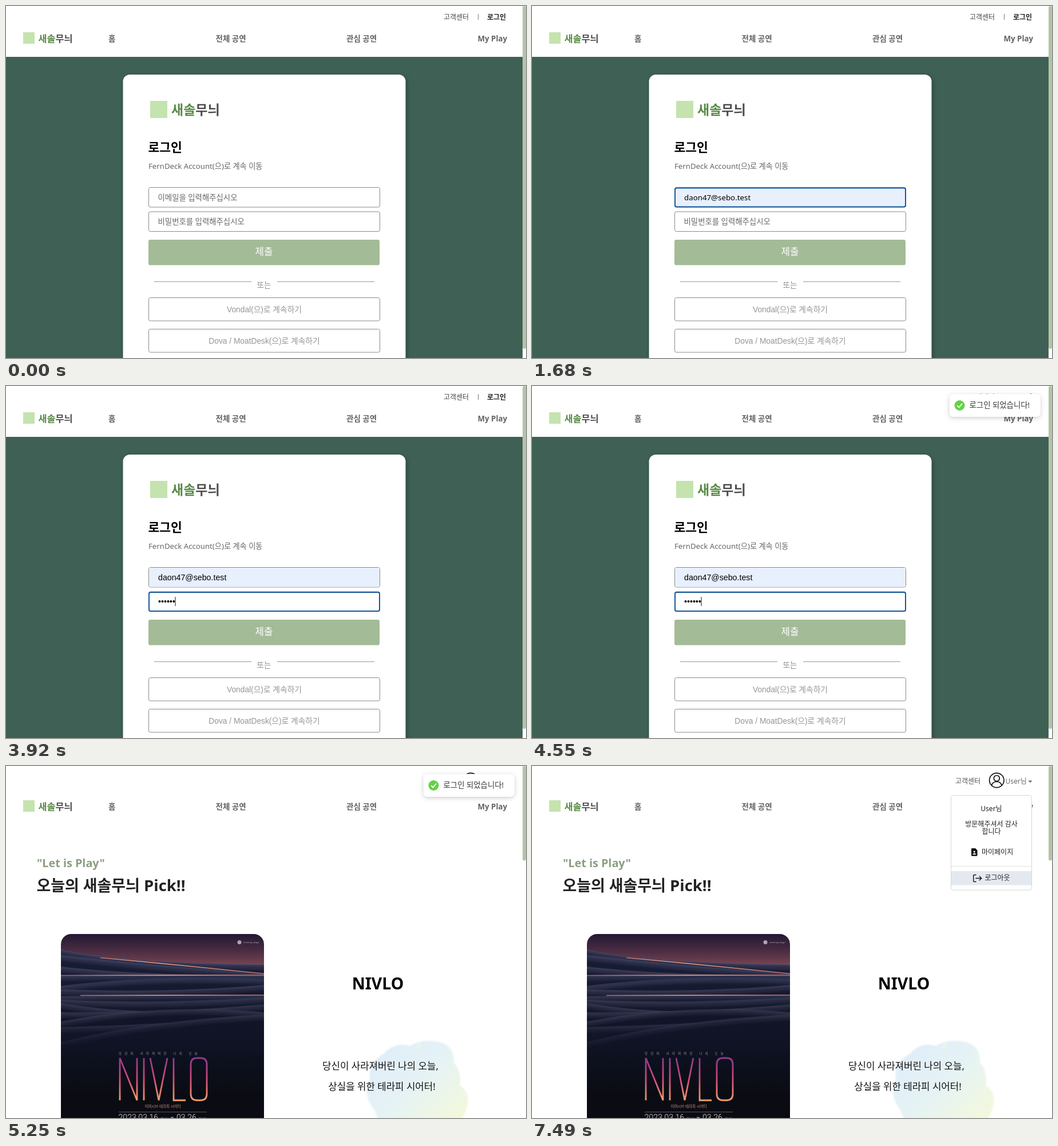
These frames come from a looping animation (909 px wide and 616 px high, 8000 ms). An HTML page:

```html
<!DOCTYPE html>
<html lang="ko">
<head>
<title>로그인</title>
<style>
html, body { margin: 0; width: 100%; height: 100%; overflow: hidden; background: #fff; }
svg { display: block; width: 909px; height: 616px; }
text { font-family: "Noto Sans", "Noto Sans CJK KR", sans-serif; font-size: 12px; fill: #222; white-space: pre; }
.mid { text-anchor: middle; }
.bold { font-weight: 700; }
.medium { font-weight: 500; }
.nav text { font-size: 13.5px; font-weight: 600; fill: #636363; }
.brand { font-weight: 700; fill: #4d4d4d; }
.brand tspan { fill: #588a45; }
.arial text, text.arial { font-family: "Liberation Sans", "Noto Sans CJK KR", sans-serif; font-size: 13.75px; }
.hint { font-size: 13.4px; fill: #666; }
.box { fill: #fff; stroke: #8a8a8a; }
.ring { fill: none; stroke: #16589a; stroke-width: 2; }
.caret { stroke: #111; }
.card { fill: #fff; filter: drop-shadow(2px 3px 4px rgba(0,0,0,.3)); }
.hover { fill: #e4e9f0; }
.date text { font-family: Roboto, sans-serif; font-weight: 300; font-size: 14.2px; fill: #e5dfe0; }
.date .day { font-size: 7px; }

/* everything shares one 8 s clock */
.k { animation: 8s step-end infinite; }
.login { animation-name: login; }
.main { animation-name: main; }
.shift { animation-name: shift; }
.guest { animation-name: guest; }
.member { animation-name: member; }
.mail-hint { animation-name: mailHint; }
.mail-ring { animation-name: mailRing; }
.mail-caret { animation-name: mailCaret; }
.mail-fill { animation-name: mailFill; }
.mail-preview { animation-name: mailPreview; }
.mail-text { animation-name: mailText; }
.end-caret { animation-name: endCaret; }
.pass-ring { animation-name: passRing; }
.pass-hint { animation-name: passHint; }
.pass-dots { animation-name: passDots; }
.pass-cover { animation-name: passCover; }
.pass-caret { animation-name: passCaret; }
.user { animation-name: userHover; }
.menu { animation-name: menu; }
.hover1 { animation-name: hover1; }
.hover2 { animation-name: hover2; }
.hover3 { animation-name: hover3; }
@keyframes login { 0% { opacity: 1 } 57.75% { opacity: 0 } }
@keyframes main { 0% { opacity: 0 } 57.75% { opacity: 1 } }
@keyframes shift { 0% { transform: none } 59.5% { transform: translateY(14px) } }
@keyframes guest { 0% { opacity: 1 } 59.5% { opacity: 0 } }
@keyframes member { 0% { opacity: 0 } 59.5% { opacity: 1 } }
@keyframes mailHint { 0% { opacity: 1 } 19.25% { opacity: 0 } }
@keyframes mailRing { 0% { opacity: 0 } 14% { opacity: 1 } 28% { opacity: 0 } }
@keyframes mailCaret { 0% { opacity: 0 } 14% { opacity: 1 } 21% { opacity: 0 } }
@keyframes mailFill { 0% { opacity: 0 } 19.25% { opacity: 1 } }
@keyframes mailPreview { 0% { opacity: 0 } 19.25% { opacity: 1 } 25.375% { opacity: 0 } }
@keyframes mailText { 0% { opacity: 0 } 25.375% { opacity: 1 } }
@keyframes endCaret { 0% { opacity: 0 } 25.375% { opacity: 1 } 28% { opacity: 0 } }
@keyframes passRing { 0% { opacity: 0 } 28% { opacity: 1 } }
@keyframes passHint { 0% { opacity: 1 } 35% { opacity: 0 } }
@keyframes passDots { 0% { opacity: 0 } 35% { opacity: 1 } }
@keyframes passCover {
  0% { transform: none } 35% { transform: translateX(10px) } 38.5% { transform: translateX(15px) }
  41.125% { transform: translateX(20px) } 42% { transform: translateX(25px) } 43.75% { transform: translateX(30px) }
}
@keyframes passCaret {
  0% { opacity: 0 } 28% { opacity: 1 } 34.125% { opacity: 0 } 35% { opacity: 1 }
  50% { opacity: 0 } 56.875% { opacity: 1 }
}
@keyframes userHover { 0% { fill: #6b6b6b } 84% { fill: #222 } 91% { fill: #6b6b6b } }
@keyframes menu { 0% { opacity: 0 } 88.375% { opacity: 1 } }
@keyframes hover1 { 0% { opacity: 0 } 91% { opacity: 1 } 92.75% { opacity: 0 } }
@keyframes hover2 { 0% { opacity: 0 } 92.75% { opacity: 1 } 93.625% { opacity: 0 } }
@keyframes hover3 { 0% { opacity: 0 } 93.625% { opacity: 1 } }

.toast, .disc { transform-box: fill-box; transform-origin: center; }
.toast { animation: toast 8s infinite; }
.disc { animation: disc 8s infinite; }
.tick { stroke-dasharray: 15; animation: tick 8s infinite; }
@keyframes toast {
  0%, 48.99% { opacity: 0; transform: translateY(-80px) scale(.6); }
  49% { opacity: .5; transform: translateY(-80px) scale(.6); animation-timing-function: cubic-bezier(.21,1.02,.73,1); }
  53.375%, 75.1% { opacity: 1; transform: none; animation-timing-function: ease-out; }
  76.1%, 100% { opacity: 0; transform: translateY(-60px) scale(.6); }
}
@keyframes disc {
  0%, 50.25% { transform: scale(0) rotate(45deg); animation-timing-function: cubic-bezier(.175,.885,.32,1.275); }
  54%, 100% { transform: none; }
}
@keyframes tick {
  0%, 51.5% { stroke-dashoffset: 15; animation-timing-function: ease-out; }
  54%, 100% { stroke-dashoffset: 0; }
}
.bar { animation: bar 8s infinite; }
.loader { animation: loader 8s linear infinite; }
.spin { transform-origin: 881.6px 21.3px; animation: spin 8s linear infinite; }
@keyframes bar {
  0%, 57.5% { transform: scaleX(.1); animation-timing-function: linear; }
  57.75% { transform: scaleX(.172); animation-timing-function: ease; }
  60.5%, 100% { transform: none; }
}
@keyframes loader { 0%, 57.74% { opacity: 0 } 57.75%, 62.5% { opacity: 1 } 65.5%, 100% { opacity: 0 } }
@keyframes spin { from { transform: rotate(207deg) } to { transform: rotate(7407deg) } }
</style>
</head>
<body>
<svg viewBox="0 0 909 616">
  <defs>
    <clipPath id="frame"><rect x="96" y="280" width="355" height="400" rx="18"/></clipPath>
    <linearGradient id="sky" gradientUnits="userSpaceOnUse" x1="0" y1="280" x2="0" y2="345">
      <stop stop-color="#211a33"/><stop offset=".45" stop-color="#4a2c42"/><stop offset="1" stop-color="#8a4f58"/>
    </linearGradient>
    <linearGradient id="night" gradientUnits="userSpaceOnUse" x1="0" y1="425" x2="0" y2="560">
      <stop stop-color="#141830" stop-opacity="0"/><stop offset=".5" stop-color="#0d1120"/><stop offset="1" stop-color="#0b0c13"/>
    </linearGradient>
    <linearGradient id="neon" gradientUnits="userSpaceOnUse" x1="0" y1="496" x2="0" y2="572">
      <stop stop-color="#8a3a8c"/><stop offset=".5" stop-color="#d04a78"/><stop offset="1" stop-color="#eda06c"/>
    </linearGradient>
    <linearGradient id="ember" gradientUnits="userSpaceOnUse" x1="96" y1="0" x2="451" y2="0">
      <stop stop-color="#a35a60"/><stop offset=".5" stop-color="#f0a184"/><stop offset="1" stop-color="#b9696a"/>
    </linearGradient>
    <linearGradient id="wash" x1="0" y1="0" x2="1" y2="1">
      <stop stop-color="#dcebfb"/><stop offset=".5" stop-color="#e6f3f4"/><stop offset="1" stop-color="#f7f9d4"/>
    </linearGradient>
  </defs>
  <rect width="909" height="616" fill="#fff"/>

  <g class="k login">
    <rect y="89" width="903" height="527" fill="#3f6155"/>
    <rect class="card" x="204.5" y="120" width="494" height="540" rx="12"/>
    <rect x="252" y="166" width="30" height="30" fill="#c4e3ae"/>
    <text class="brand" x="289" y="190" style="font-size:23px"><tspan>새솔</tspan>무늬</text>
    <text class="bold" x="248.5" y="254.5" style="font-size:21.5px;fill:#000">로그인</text>
    <text class="hint" x="249" y="285" style="font-size:13.2px">FernDeck Account(으)로 계속 이동</text>

    <rect class="box" x="249.5" y="317.5" width="404" height="34.5" rx="3"/>
    <rect class="k mail-fill" x="250" y="318" width="403" height="33.5" rx="2.5" fill="#e8f0fe"/>
    <text class="hint k mail-hint" x="265.5" y="339.5">이메일을 입력해주십시오</text>
    <text class="k mail-preview" x="266" y="339.5" style="font-size:13.3px;fill:#000">daon47@sebo.test</text>
    <text class="arial k mail-text" x="266" y="339.5" style="font-size:14.2px;fill:#000">daon47@sebo.test</text>
    <rect class="ring k mail-ring" x="250" y="318.5" width="403" height="33" rx="3"/>
    <path class="caret k mail-caret" d="M266.5 327v16"/>
    <path class="caret k end-caret" d="M386.5 327v16"/>

    <rect class="box" x="249.5" y="360" width="404" height="34.5" rx="3"/>
    <text class="arial k pass-dots" x="266" y="381.5" style="font-size:14.2px;fill:#000">••••••</text>
    <g class="k pass-cover">
      <rect x="266" y="367" width="36" height="20" fill="#fff"/>
      <path class="caret k pass-caret" d="M266 369v16"/>
    </g>
    <text class="hint k pass-hint" x="265.5" y="382">비밀번호를 입력해주십시오</text>
    <rect class="ring k pass-ring" x="250" y="361" width="403" height="33" rx="3"/>

    <rect x="249" y="409" width="404" height="44.5" rx="3" fill="#a3bb97"/>
    <text class="mid medium" x="451" y="436" style="font-size:16.8px;fill:#fff">제출</text>
    <path d="M259 482.5h170M474 482.5h170" stroke="#999"/>
    <text class="mid" x="451" y="493" style="font-size:13.4px;fill:#8c8c8c">또는</text>
    <rect class="box" x="249.5" y="510.5" width="404" height="40.5" rx="3"/>
    <rect class="box" x="249.5" y="565.5" width="404" height="40.5" rx="3"/>
    <g class="arial mid">
      <text x="451.5" y="535.5" style="fill:#959595">Vondal(으)로 계속하기</text>
      <text x="451.5" y="590.5" style="fill:#959595">Dova / MoatDesk(으)로 계속하기</text>
    </g>
    <rect x="903" width="6" height="600" rx="3" fill="#b5c4a8"/>
  </g>

  <g class="k main">
    <g class="k shift">
      <text class="bold" x="54" y="163" style="font-size:19.8px;fill:#8a9f80">"Let is Play"</text>
      <g style="font-weight:800">
        <text x="53.5" y="204.5" style="font-size:26.9px">오늘의 새솔무늬</text>
        <text x="241" y="204.5" style="font-size:27.5px">Pick!!</text>
      </g>
      <g clip-path="url(#frame)">
        <rect x="96" y="280" width="355" height="400" fill="url(#sky)"/>
        <g id="hills" fill="none"></g>
        <rect x="96" y="425" width="355" height="260" fill="url(#night)"/>
        <path d="M165 321.5Q300 334 451 349.5M96 352.5L451 352M130 387.5L451 387" stroke="url(#ember)" stroke-width="1.5" fill="none"/>
        <circle cx="408" cy="294.5" r="3.5" fill="#b3a3b2"/>
        <text x="415" y="296" style="font-size:4.2px;fill:#b3a3b2">evening stage</text>
        <text x="197" y="490.5" style="font-size:5.5px;fill:#a9959c;letter-spacing:5.2px">당신이 사라져버린 나의 오늘</text>
        <path aria-label="NIVLO" d="M199 571V497L229 571V497M241 497V571M252 497L267 571L282 497M293 497V571H314M334 497Q323 497 323 508V560Q323 571 334 571H340Q351 571 351 560V508Q351 497 340 497Z" fill="none" stroke="url(#neon)" stroke-width="2.8"/>
        <text class="mid" x="274" y="583.5" style="font-size:6.5px;fill:#cf9274">이머시브 테라피 시어터</text>
        <path d="M197 591.5H351M197 608.5H351" stroke="#7d7377" stroke-width=".7"/>
        <g class="date">
          <text x="196.5" y="605.5">2023.03.16</text>
          <text class="day" x="270.5" y="605.5">THU</text>
          <text x="298" y="605.5">03.26</text>
          <text class="day" x="337" y="605.5">SUN</text>
          <path d="M288 601h5" stroke="#e5dfe0"/>
        </g>
      </g>
      <text class="mid" x="650" y="377" style="font-size:28.4px;font-weight:900;fill:#000">NIVLO</text>
      <g fill="url(#wash)" style="filter:blur(1.5px)">
        <path d="M660 490Q680 468 706 476Q728 462 762 470Q784 478 783 505Q797 520 793 545Q812 556 806 582Q800 612 770 616Q735 632 690 620Q650 616 645 590Q622 560 636 535Q632 505 660 490Z"/>
        <circle cx="719" cy="476" r="6"/>
      </g>
      <g class="mid medium">
        <text x="654.5" y="517" style="font-size:16.8px;fill:#111">당신이 사라져버린 나의 오늘,</text>
        <text x="657" y="552.5" style="font-size:16.8px;fill:#111">상실을 위한 테라피 시어터!</text>
      </g>
    </g>
    <rect x="903" width="6" height="165.5" rx="3" fill="#b5c4a8"/>
  </g>

  <g class="nav k shift">
    <rect x="30" y="46" width="20" height="20" fill="#c4e3ae"/>
    <text class="brand" x="56.5" y="63" style="font-size:16.3px;font-weight:700;fill:#4d4d4d"><tspan>새솔</tspan>무늬</text>
    <text x="179" y="62">홈</text>
    <text x="366.5" y="62">전체 공연</text>
    <text x="595" y="62">관심 공연</text>
    <text x="824.5" y="61.5" style="font-size:13.3px">My Play</text>
  </g>

  <g class="k guest medium">
    <text x="765" y="23.5" style="fill:#444">고객센터</text>
    <path d="M825.5 14v10" stroke="#777"/>
    <text class="bold" x="841" y="23.5">로그인</text>
  </g>
  <g class="k member">
    <text class="medium" x="740" y="30.5" style="fill:#555">고객센터</text>
    <g fill="none" stroke="#111" stroke-width="1.7">
      <circle cx="812.3" cy="25" r="12.7"/>
      <circle cx="812.3" cy="21.5" r="5"/>
      <path d="M803.5 34Q805 27.5 812.3 27.5Q819.6 27.5 821 34"/>
    </g>
    <text class="k user" x="827.5" y="30.5">User님</text>
    <path class="k user" d="M867.5 25.5h7l-3.5 3.8z"/>
  </g>

  <g class="k menu">
    <rect x="732.5" y="51.5" width="141" height="165.5" rx="4" fill="#fff" stroke="#d6d6d6"/>
    <rect class="hover k hover1" x="733" y="59" width="140" height="66"/>
    <rect class="hover k hover2" x="733" y="138" width="140" height="25"/>
    <rect class="hover k hover3" x="733" y="184" width="140" height="24.5"/>
    <g class="mid">
      <text x="803" y="78.5">User님</text>
      <text x="803" y="105.5">방문해주셔서 감사</text>
      <text x="803" y="118.5">합니다</text>
    </g>
    <path d="M769 144h6l3.5 3.5v9q0 1-1 1h-8.5q-1 0-1-1v-11.5q0-1 1-1z" fill="#111"/>
    <circle cx="773.2" cy="150" r="1.6" fill="#fff"/>
    <path d="M770 155q.5-2.5 3.2-2.5t3.2 2.5z" fill="#fff"/>
    <text x="786" y="154.5">마이페이지</text>
    <path d="M733 175.5h140" stroke="#e2e2e2"/>
    <path d="M776.5 190.5h-3q-1.8 0-1.8 1.8v8.4q0 1.8 1.8 1.8h3M775.5 196.5h10M782 192.8l3.7 3.7l-3.7 3.7" fill="none" stroke="#111" stroke-width="1.4"/>
    <text x="791.5" y="200">로그아웃</text>
  </g>

  <g class="loader">
    <rect class="bar" width="909" height="2.7" fill="#22a0dd"/>
    <path class="spin" d="M876.6 26.3A7.1 7.1 0 1 1 886.6 16.3" fill="none" stroke="#22a0dd" stroke-width="1.8"/>
  </g>

  <g class="toast">
    <rect x="729.5" y="14" width="159.5" height="40" rx="7" fill="#fff" style="filter:drop-shadow(0 2px 4px rgba(0,0,0,.17)) drop-shadow(0 1px 1px rgba(0,0,0,.06))"/>
    <g class="disc">
      <circle cx="747.5" cy="34" r="9" fill="#61d345"/>
      <path class="tick" d="M743.2 34.2L746.2 37.5L752 30.8" fill="none" stroke="#fff" stroke-width="1.9"/>
    </g>
    <text x="764.5" y="38" style="font-size:13.4px;fill:#363636">로그인 되었습니다!</text>
  </g>
</svg>
<script>
// Layered poster hills: left height, control point x and y, right height
const hills = [
  [308, 200, 332, 334], [318, 250, 336, 349], [338, 230, 354, 352], [353, 270, 350, 353],
  [372, 250, 352, 360], [378, 300, 384, 370], [390, 240, 386, 387], [396, 260, 404, 392],
  [402, 250, 428, 408], [418, 280, 420, 404], [434, 270, 402, 418], [444, 260, 440, 426],
  [470, 250, 432, 422]
];
const group = document.getElementById("hills");
function addPath(attrs) {
  const path = document.createElementNS("http://www.w3.org/2000/svg", "path");
  for (const name in attrs) path.setAttribute(name, attrs[name]);
  group.append(path);
}
hills.forEach(([left, cx, cy, right], n) => {
  const curve = dy => `M96 ${left + dy}Q${cx} ${cy + dy} 451 ${right + dy}`;
  addPath({ d: curve(0) + "V690H96Z", fill: `hsl(229 38% ${15 - n * 0.4}%)` });
  for (let i = 0; i < 7; i++) {
    addPath({
      d: curve(i * 1.6),
      stroke: `hsl(240 17% ${37 - n * 0.6}%)`,
      "stroke-opacity": 0.6 * (1 - i / 7),
      "stroke-width": 1.8
    });
  }
});
</script>
</body>
</html>
```
